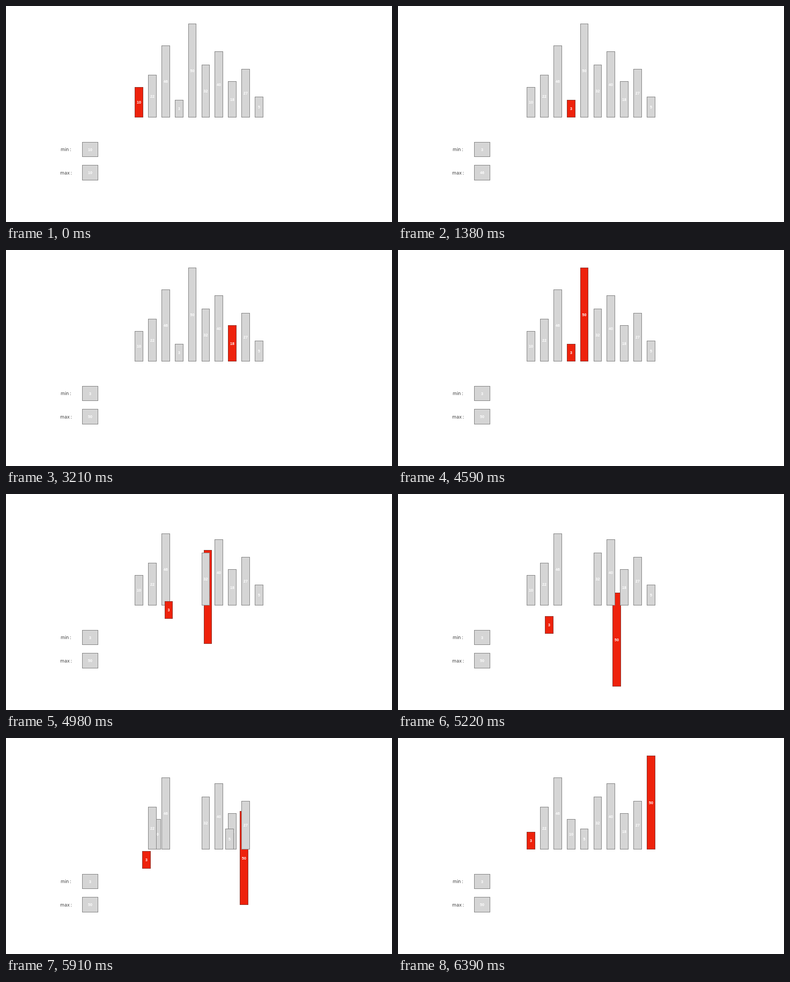
An HTML page with a canvas for the animation above (6870 ms loop, 720 px wide and 405 px high).

```html
<!DOCTYPE html>
<html lang="en">
<head>
<meta charset="utf-8">
<title>Find the minimum and maximum</title>
<style>
  html, body { margin: 0; width: 100%; height: 100%; overflow: hidden; background: #fff; }
  canvas { display: block; }
</style>
</head>
<body>
<canvas width="720" height="405"></canvas>
<script>
const ctx = document.querySelector('canvas').getContext('2d');

const LOOP = 6870, TICK = 30, SCAN_STEP = 458, SWAP_START = 4590, SWAP_TIME = 900;
const LEFT = 240.3, FLOOR = 209, PITCH = 24.85, BAR_WIDTH = 15.7;
const GRAY = '#d5d5d5', RED = '#ee220c', EDGE = 'rgba(70, 70, 70, 0.55)';

const values = [10, 22, 46, 3, 50, 32, 40, 18, 27, 5];
const heights = [57, 80, 135, 33, 176, 99, 124, 68, 91, 39];
const min = Math.min(...values), max = Math.max(...values);
const minSlot = values.indexOf(min), maxSlot = values.indexOf(max);
const lastSlot = values.length - 1;

const mix = (a, b, p) => a + (b - a) * p;

// cubic-bezier(.42, 0, .58, 1), solved for x by Newton's method
function easeInOut(x) {
  x = Math.min(1, Math.max(0, x));
  let s = x;
  for (let i = 0; i < 6; i++) {
    s -= (((0.52 * s - 0.78) * s + 1.26) * s - x) / ((1.56 * s - 1.56) * s + 1.26);
  }
  return s * s * (3 - 2 * s);
}

// Edges snap to whole pixels
function drawBox(value, left, top, width, height, fill) {
  const x = Math.round(left), y = Math.round(top);
  const w = Math.round(left + width) - x, h = Math.round(top + height) - y;
  ctx.fillStyle = fill;
  ctx.fillRect(x, y, w, h);
  ctx.strokeStyle = EDGE;
  ctx.strokeRect(x + 0.5, y + 0.5, w - 1, h - 1);
  ctx.fillStyle = '#fff';
  ctx.font = 'bold 7px "Liberation Sans", sans-serif';
  ctx.textAlign = 'center';
  ctx.fillText(value, x + w / 2, y + h / 2 + 2.5);
}

function drawResult(name, value, x, y) {
  ctx.fillStyle = '#444';
  ctx.font = '9px Inter, sans-serif';
  ctx.textAlign = 'left';
  ctx.fillText(name + '\u2009:', x, y + 17.5);
  drawBox(value, 142, y, 30, 28.5, GRAY);
}

function draw(t) {
  const current = Math.floor(t / SCAN_STEP);
  const swapping = t >= SWAP_START;
  const progress = (t - SWAP_START) / SWAP_TIME;
  const out = easeInOut(progress), back = easeInOut(progress - 1);

  ctx.fillStyle = '#fff';
  ctx.fillRect(0, 0, 720, 405);

  values.forEach((value, i) => {
    const height = heights[i];
    let slot = i, drop = 0;
    // The extremes dip below the row on their way to the ends
    const dip = (via, end, depth) => {
      slot = mix(mix(i, via, out), end, back);
      if (back > 0) slot = mix(via, end, back);
      drop = depth * (out - back);
    };
    if (i === minSlot) dip(1, 0, 65);
    if (i === maxSlot) dip(7, lastSlot, 187);
    if (i === 0) slot = mix(0, minSlot, back);
    if (i === lastSlot) slot = mix(lastSlot, maxSlot, back);

    const red = swapping ? value === min || value === max : i === current;
    drawBox(value, LEFT + slot * PITCH, FLOOR - height + drop, BAR_WIDTH, height, red ? RED : GRAY);
  });

  const seen = values.slice(0, current + 1);
  drawResult('min', Math.min(...seen), 102, 254.8);
  drawResult('max', Math.max(...seen), 101, 298.2);
}

function frame() {
  const t = performance.now() % LOOP;
  draw(Math.floor(t / TICK) * TICK);
  requestAnimationFrame(frame);
}
frame();
</script>
</body>
</html>
```
